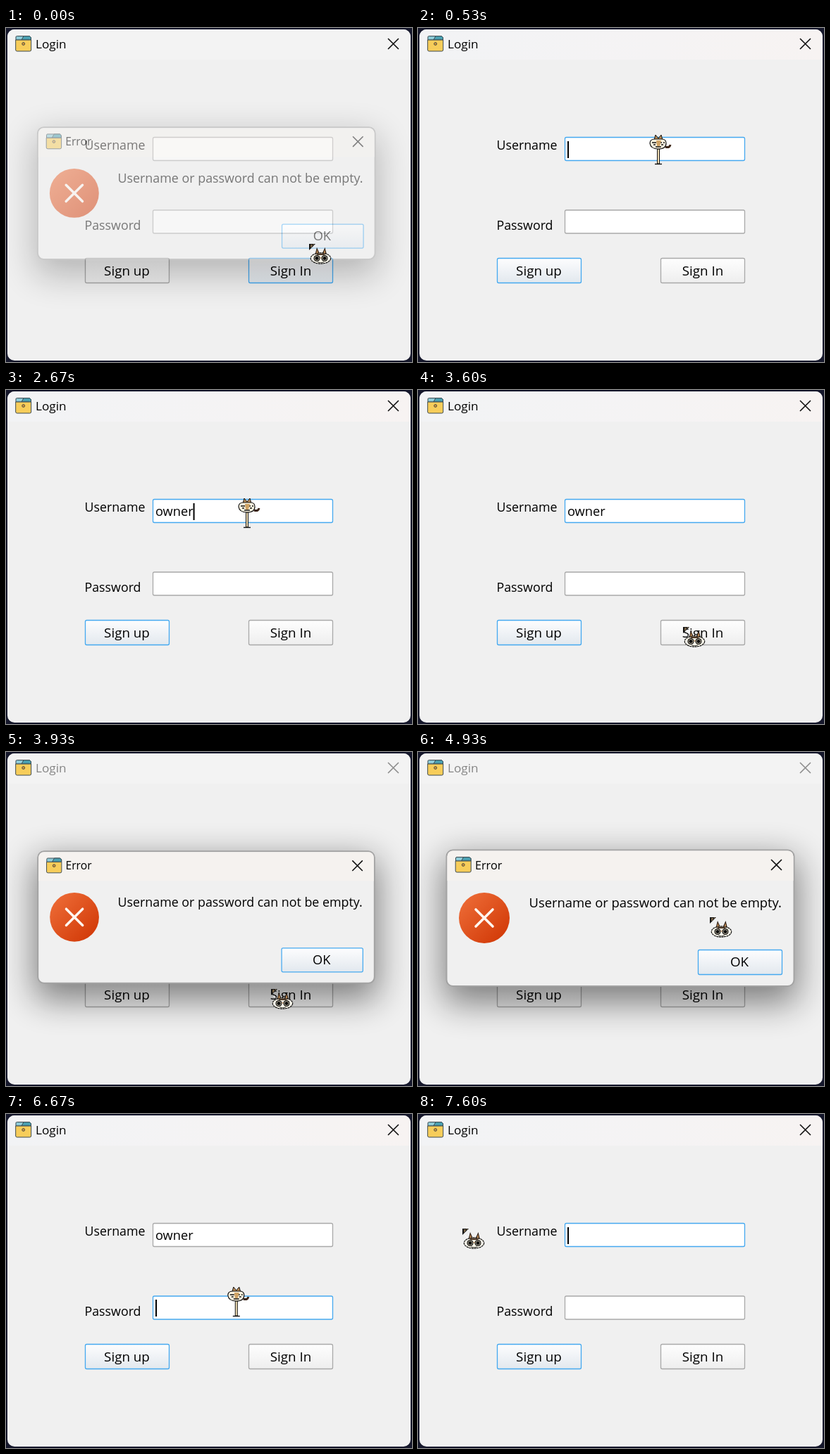
An HTML page that plays this animation: 576 by 475 pixels, repeating every 8 s.

```html
<!DOCTYPE html>
<html lang="en">
<head>
<meta charset="utf-8">
<title>Login</title>
<style>
  html, body { margin: 0; width: 100%; height: 100%; overflow: hidden; background: #15172b; }
  svg { display: block; width: 576px; height: 475px; }
  text { font: 18.2px "Open Sans", "Noto Sans", sans-serif; white-space: pre; }
  .mid { text-anchor: middle; font-size: 18.8px; }
  .label { font-size: 17.8px; }
  .box { stroke: #a9a9a9; stroke-width: 1.3; }
  .field { fill: #fff; }
  .btn { fill: url(#plain); }
  .on { stroke: #45a9f0; }
  .btn.on { fill: url(#hot); }
  .x { fill: none; stroke: #111; stroke-width: 1.6; }
</style>
</head>
<body>
<svg viewBox="0 0 576 475">
  <defs>
    <linearGradient id="plain" x2="0" y2="1"><stop stop-color="#fefefe"/><stop offset="1" stop-color="#eeeeee"/></linearGradient>
    <linearGradient id="hot" x2="0" y2="1"><stop stop-color="#fdfdfe"/><stop offset="1" stop-color="#e2e8ee"/></linearGradient>
    <linearGradient id="red" x2="1" y2="1"><stop offset=".1" stop-color="#ec6a35"/><stop offset=".9" stop-color="#d23a08"/></linearGradient>
    <linearGradient id="tint"><stop stop-color="#f2f3f5"/><stop offset=".6" stop-color="#f5f3f4"/><stop offset="1" stop-color="#f7f3f2"/></linearGradient>
    <filter id="blur" x="-30%" y="-60%" width="160%" height="220%"><feGaussianBlur stdDeviation="25"/></filter>
    <g id="icon" stroke="#3d4a50" stroke-width="1" stroke-linejoin="round">
      <path d="M1 6.500V2.500q0-1.500 1.500-1.500h18l2 2V6.500z" fill="#8ecbd8"/>
      <path d="M12 1h8.500l2 2V6.500H9z" fill="#4a9fb0"/>
      <path d="M.7 6.500h22v14q0 2-2 2h-18q-2 0-2-2z" fill="#f7cd5a"/>
      <circle cx="11.700" cy="12" r="1.900" fill="#e39a2d"/>
    </g>
    <g id="cat">
      <path d="M0 0H9L0 9z" fill="#111"/>
      <path d="M2 2h3M2 4h2M6 1h1" stroke="#d9b27c" stroke-width="1.200"/>
      <path d="M4 10l3 3" stroke="#fff" stroke-width="2" stroke-dasharray="1 1"/>
      <path d="M8.500 15L11 5l4 9zM18.500 14l4-9 2.500 10z" fill="#2a1c12"/>
      <path d="M10 14l1.300-6 2.200 6zM20 14l2.200-6 1.300 6z" fill="#c58f58"/>
      <ellipse cx="16.500" cy="20.500" rx="14.200" ry="7.600" fill="#fbf7ea" stroke="#111" stroke-width="1.200" stroke-dasharray="3 .6"/>
      <path d="M9 14.500q7.500-2 15 0l-3 1.500h-9z" fill="#4a3524"/>
      <g fill="#0b0b0b"><circle cx="11" cy="20.500" r="4.500"/><circle cx="22" cy="20.500" r="4.500"/></g>
      <g fill="none" stroke="#e8dfc8" stroke-width=".8"><circle cx="11" cy="20.500" r="3"/><circle cx="22" cy="20.500" r="3"/></g>
      <path d="M15.300 19h2.500l-1.200 2z" fill="#bd8650"/>
      <path d="M12 26q4.500 1.500 9 0" fill="none" stroke="#111" stroke-width=".8"/>
    </g>
    <g id="beam">
      <path d="M-1.500-1h3V20h-3z" fill="#f5e2b8" stroke="#111"/>
      <path d="M-5 20.500H5" stroke="#111" stroke-width="1.400"/>
      <path d="M-6-14l2-7 4 5 4-5 2 7z" fill="#b88a55" stroke="#111"/>
      <path d="M10-4q6 2 7-3" fill="none" stroke="#3a2415" stroke-width="3"/>
      <path d="M-12-9q0-6 7-6H5q6 0 6 6 0 8-11 8t-12-8z" fill="#fbf4e0" stroke="#111" stroke-width="1.200"/>
      <path d="M-9-10H9" stroke="#111" stroke-width="1.500" stroke-dasharray="6 2"/>
      <path d="M-3-13H4L2-5h-4z" fill="#cfa364"/>
      <path d="M-7-7h3M4-7h3M-4-4h8" stroke="#111" stroke-width="1.300"/>
    </g>
  </defs>

  <rect x="2" y="2" width="572" height="471" rx="10" fill="#f0f0f0"/>
  <path id="bar" d="M2 45V12a10 10 0 0 1 10-10h552a10 10 0 0 1 10 10V45z" fill="#f3f3f3"/>
  <use href="#icon" x="13" y="10.500"/>
  <g id="head">
    <text x="42" y="28.800" style="font-size:17.2px">Login</text>
    <path class="x" d="M542 15l15 15m0-15l-15 15"/>
  </g>

  <text class="label" x="111.500" y="173">Username</text>
  <text class="label" x="111.500" y="287">Password</text>
  <rect id="user" class="box field" x="208.500" y="155.500" width="255" height="33" rx="2"/>
  <rect id="pass" class="box field" x="208.500" y="259" width="255" height="33" rx="2"/>
  <rect id="mark" y="161" height="24" fill="#0078d7"/>
  <text id="typed" x="212" y="179"><tspan></tspan><tspan fill="#fff"></tspan></text>
  <rect id="caret" width="2" height="24"/>
  <rect id="up" class="box btn" x="112.500" y="327.500" width="119" height="35" rx="2"/>
  <rect id="in" class="box btn" x="344.500" y="327.500" width="119" height="35" rx="2"/>
  <text class="mid" x="171.500" y="352">Sign up</text>
  <text class="mid" x="404" y="352">Sign In</text>

  <g id="dialog">
    <rect x="36" y="151" width="502" height="206" rx="10" fill="#000" opacity=".48" filter="url(#blur)"/>
    <rect x="40.500" y="139.500" width="493" height="193.500" rx="9" fill="#f0f0f0" stroke="#a3a3a3" stroke-width="2"/>
    <path d="M41.500 183V148.500a8 8 0 0 1 8-8h475a8 8 0 0 1 8 8V183z" fill="#f5f2ef"/>
    <use href="#icon" x="52.500" y="148.500"/>
    <text x="81" y="166.500" style="font-size:16.2px">Error</text>
    <path class="x" d="M501 153l15 15m0-15l-15 15"/>
    <circle cx="94" cy="236" r="36" fill="url(#red)"/>
    <path d="M82 224l24 24m0-24l-24 24" stroke="#fff6f0" stroke-width="3.600" stroke-linecap="round"/>
    <text x="157.500" y="221" style="font-size:18.4px">Username or password can not be empty.</text>
    <rect class="box btn on" x="397.500" y="281.500" width="119" height="35" rx="2"/>
    <text class="mid" x="456" y="305">OK</text>
  </g>

  <use id="pointer" href="#cat"/>
</svg>
<script>
const $ = id => document.getElementById(id);
const LOOP = 8000, FPS = 15, NAME = "owner";
const within = (t, a, b) => t >= a && t < b;

// time, x, y of the pointer's hot spot
const path = [
  [0, 430, 307], [70, 428, 303], [400, 342, 178], [500, 341, 173], [990, 341, 173],
  [1060, 341, 173.500], [1330, 341, 174], [1600, 342, 175], [3300, 342, 175], [3560, 376, 337],
  [4060, 376, 337], [4200, 340, 285], [4400, 242, 180], [4530, 320, 145], [4730, 448, 205],
  [4930, 414, 235], [5000, 414, 238], [5200, 440, 290], [5400, 447, 297], [5600, 487, 305],
  [5860, 446, 300], [6130, 360, 258], [6330, 330, 278], [6620, 330, 278], [6850, 300, 175],
  [7000, 225, 166], [7200, 68, 157], [7330, 63, 163], [8000, 63, 163]
];
const keys = [1930, 2130, 2470, 2600, 2666];

function pointAt(t) {
  const i = Math.max(1, path.findIndex(k => k[0] > t));
  const [t0, x0, y0] = path[i - 1], [t1, x1, y1] = path[i];
  const p = (t - t0) / (t1 - t0), e = p * p * (3 - 2 * p);
  return [x0 + (x1 - x0) * e, y0 + (y1 - y0) * e];
}

function dialogAt(t) {
  const closing = a => [a, .941 + .06 * a];
  if (t < 84) return closing(.5 - t * .006);
  if (within(t, 3850, 5450)) {
    const p = Math.min(1, (t - 3850) / 260);
    return [Math.min(1, (t - 3850) / 75), 1 - .1 * (1 - p) ** 3];
  }
  return within(t, 5450, 5617) ? closing(1 - (t - 5450) / 167) : [0, 1];
}

const wide = [0];
const line = $("typed"), [before, picked] = line.children;
before.textContent = NAME;
for (let i = 1; i <= NAME.length; i++) wide[i] = line.getSubStringLength(0, i);

function draw(t) {
  const [x, y] = pointAt(t);
  const modal = within(t, 3850, 5450);
  const userOn = within(t, 520, 3850) || t >= 6850;
  const passOn = within(t, 6320, 6850);
  $("user").classList.toggle("on", userOn);
  $("pass").classList.toggle("on", passOn);
  $("up").classList.toggle("on", userOn || passOn);
  $("in").classList.toggle("on", !userOn && !passOn && !modal);
  $("head").setAttribute("opacity", modal ? .45 : 1);
  $("bar").setAttribute("fill", within(t, 500, 3850) || t >= 5860 ? "url(#tint)" : "#f3f3f3");

  const n = t < 7520 ? keys.filter(k => k <= t + 4).length : 0;
  let from = n;
  if (t >= 6850) while (from > 0 && x < 212 + (wide[from] + wide[from - 1]) / 2) from--;
  before.textContent = NAME.slice(0, from);
  picked.textContent = NAME.slice(from, n);
  $("mark").setAttribute("x", 212 + wide[from]);
  $("mark").setAttribute("width", wide[n] - wide[from]);

  const blink = within(t, 520, 1060) || within(t, 1590, 3330) || within(t, 6850, 7000) || t >= 7590;
  $("caret").setAttribute("x", passOn ? 212 : 212 + wide[from]);
  $("caret").setAttribute("y", passOn ? 264 : 161);
  $("caret").setAttribute("opacity", blink || passOn ? 1 : 0);

  const [alpha, scale] = dialogAt(t);
  $("dialog").setAttribute("opacity", alpha);
  $("dialog").setAttribute("transform", `translate(192 198) scale(${scale}) translate(-192 -198)`);

  const inField = within(x, 208, 464) && (within(y, 155, 189) || within(y, 259, 293));
  const beam = !modal && (inField || within(t, 6850, 7300));
  $("pointer").setAttribute("href", beam ? "#beam" : "#cat");
  $("pointer").setAttribute("transform", `translate(${x} ${y})`);
}

function tick() {
  const t = performance.now() % LOOP;
  draw(Math.floor((t + 5) * FPS / 1000) * 1000 / FPS % LOOP);
  requestAnimationFrame(tick);
}
tick();
</script>
</body>
</html>
```
